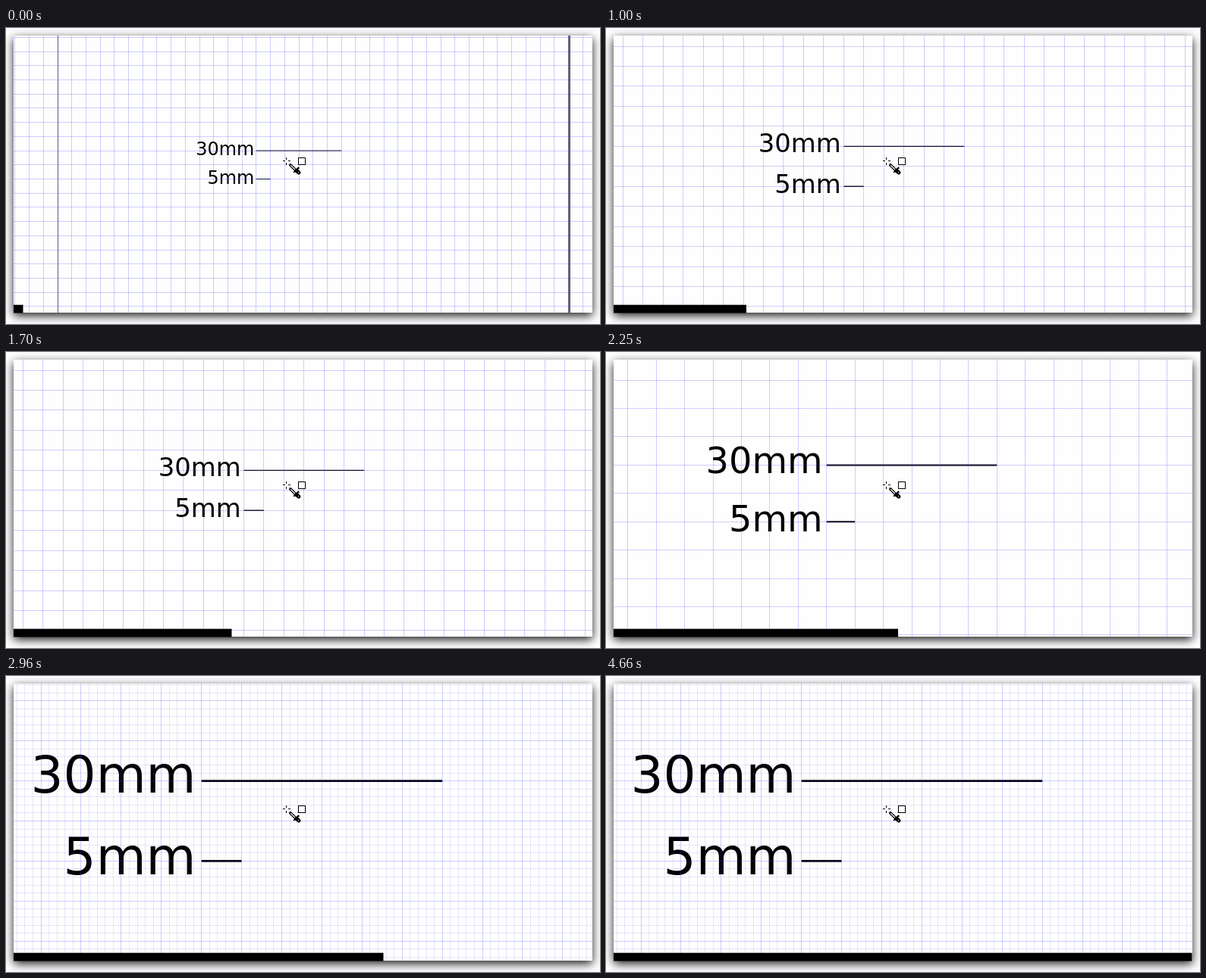
These frames come from a looping animation (783x391 px, 4.74 s). An HTML page with a canvas:

```html
<!DOCTYPE html>
<html lang="en">
<head>
<meta charset="utf-8">
<title>Zooming a millimetre grid</title>
<style>
  html, body { margin: 0; width: 100%; height: 100%; overflow: hidden; background: #fff; }
  canvas { display: block; }
</style>
</head>
<body>
<canvas id="view" width="783" height="391"></canvas>
<script>
const ctx = document.getElementById('view').getContext('2d');
const LOOP = 4740, LEFT = 10, TOP = 10, RIGHT = 773, BOTTOM = 376;
const WIDTH = RIGHT - LEFT, HEIGHT = BOTTOM - TOP;

// Runs of evenly spaced ticks: first time, last time, count
const runs = [
  [0, 0, 1], [70, 540, 7], [620, 1080, 7], [1160, 1650, 7], [1700, 2180, 7],
  [2250, 2720, 7], [2800, 3280, 7], [3350, 3820, 7], [3900, 4350, 7], [4430, 4660, 4]
];
const ticks = runs.flatMap(([a, b, n]) =>
  Array.from({ length: n }, (_, i) => n > 1 ? Math.round((a + (b - a) * i / (n - 1)) / 10) * 10 : a));

// Each zoom level: first tick, left page edge, height of the upper sample
const views = [
  { tick: 0, page: 68, y: 162.09 },
  { tick: 13, page: -57, y: 156.35 },
  { tick: 25, page: -233, y: 149.4 },
  { tick: 37, page: -483, y: 138.6 }
];

function rect(x, y, w, h, color) {
  ctx.fillStyle = color;
  ctx.fillRect(x, y, w, h);
}

function stroke(x1, y1, x2, y2, width, color) {
  ctx.strokeStyle = color;
  ctx.lineWidth = width;
  ctx.beginPath();
  ctx.moveTo(x1, y1);
  ctx.lineTo(x2, y2);
  ctx.stroke();
}

function drawSheet() {
  rect(0, 0, 783, 391, '#fff');
  ctx.save();
  ctx.shadowColor = 'rgba(0, 0, 0, .9)';
  ctx.shadowBlur = 12;
  ctx.shadowOffsetY = 4;
  rect(LEFT, TOP, WIDTH, HEIGHT, '#fefefe');
  ctx.restore();
}

function drawGrid(x0, y0, unit, parts) {
  const gap = unit / parts;
  const shade = k => `rgba(63, 63, 255, ${k % parts ? .125 : .25})`;
  for (let k = Math.ceil((LEFT - x0) / gap); x0 + k * gap < RIGHT; k++)
    rect(Math.floor(x0 + k * gap), TOP, 1, HEIGHT, shade(k));
  for (let k = Math.ceil((TOP - y0) / gap); y0 + k * gap < BOTTOM; k++)
    rect(LEFT, Math.floor(y0 + k * gap), WIDTH, 1, shade(k));
}

function drawLabel(text, x, y, unit) {
  ctx.fillStyle = '#000';
  ctx.font = `${unit * 1.28}px "DejaVu Sans", sans-serif`;
  ctx.textAlign = 'right';
  ctx.fillText(text, x - unit * .135, y);
}

function drawCursor() {
  for (const d of [-5, 2]) {
    rect(370 + d, 175, 3, 1, '#000');
    rect(369, 176 + d, 1, 3, '#000');
  }
  rect(385, 171, 10, 10, '#000');
  rect(386, 172, 8, 8, '#fff');
  ctx.lineCap = 'round';
  stroke(375, 181, 382, 188, 3.8, '#000');
  stroke(375.5, 181.5, 381, 187, 1.1, '#fff');
  stroke(380, 190, 385.5, 184.8, 2.4, '#000');
  stroke(383, 188.5, 386, 191, 5, '#000');
  ctx.lineCap = 'butt';
  rect(385, 190, 1, 1, '#fff');
}

function draw(step) {
  const zoom = views.filter(v => step >= v.tick).length - 1;
  const { page, y } = views[zoom];
  const unit = 18.706 * 2 ** (zoom / 2);
  const x = page + 14 * unit;

  drawSheet();
  rect(page, TOP, 1, HEIGHT, '#666');
  if (page + 36 * unit < RIGHT) rect(Math.floor(page + 36 * unit), TOP, 3, HEIGHT, '#666');
  drawLabel('30mm', x, y + .29 * unit, unit);
  drawLabel('5mm', x, y + 2.33 * unit, unit);
  stroke(x, y, x + 6 * unit, y, unit * .053, '#000');
  stroke(x, y + 2 * unit, x + unit, y + 2 * unit, unit * .053, '#000');
  drawGrid(x, y, unit, zoom === 3 ? 5 : 1);
  drawCursor();
  rect(LEFT, 365.7, 12.5 * (step + 1), 10.8, '#000');
}

let shown = -1;
const start = performance.now();

function frame() {
  const time = (performance.now() - start) % LOOP;
  const step = ticks.filter(t => t <= time).length - 1;
  if (step !== shown) draw(shown = step);
  requestAnimationFrame(frame);
}
frame();
</script>
</body>
</html>
```
